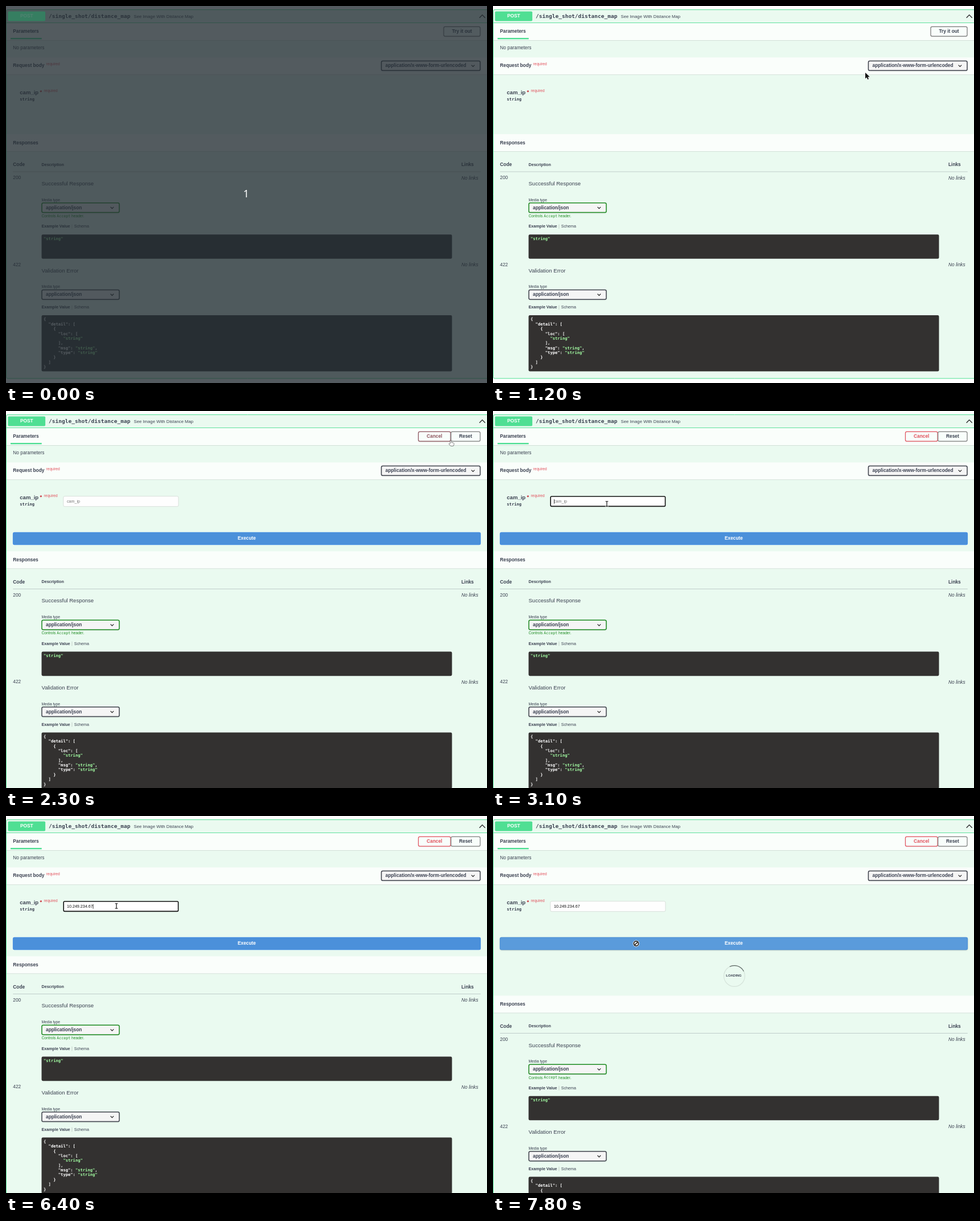
Write an HTML page with a canvas that moves like this. It is 845x662 px and loops after 8 s.

```html
<!DOCTYPE html>
<html lang="en">
<head>
<meta charset="utf-8">
<title>API form</title>
<style>
html, body { margin: 0; width: 100%; height: 100%; overflow: hidden; background: #fff }
canvas { display: block }
</style>
</head>
<body>
<canvas id="stage" width="845" height="662"></canvas>
<script>
const ctx = document.getElementById('stage').getContext('2d');
const LOOP = 8000, INK = '#3b4151', GREEN = '#4fdf93', RED = '#e2505c', LIME = '#a2fca2';
const SANS = '"Liberation Sans", Arial, sans-serif', MONO = '"DejaVu Sans Mono", monospace';
const BODY = 8.34, SMALL = 7.15, TINY = 6.67, BIG = 9.54;

const IP = '10.249.234.67';
const KEY_TIMES = [4000, 4200, 4400, 4700, 4800, 5000, 5200, 5400, 5500, 5700, 5900, 6100, 6400];

// Pointer positions: start time, x, y, shape
const POINTER = [
  [0, 0, 0, ''],
  [1000, 284, 47, 'arrow'], [1100, 480, 84, 'arrow'], [1200, 654, 117, 'arrow'],
  [1400, 706, 116, 'hand'], [1500, 822, 100, 'hand'], [1600, 780, 78, 'arrow'], [1700, 736, 67, 'arrow'],
  [1900, 768, 58, 'arrow'], [2000, 781.5, 52, 'hand'],
  [2500, 600, 92, 'arrow'], [2600, 380, 136, 'arrow'], [2700, 242, 159, 'beam'],
  [2900, 214, 170, 'arrow'], [3000, 204, 165, 'beam'], [3100, 200, 163, 'beam'], [3500, 194, 158, 'beam'],
  [7300, 206, 178, 'arrow'], [7400, 232, 204, 'arrow'], [7500, 250, 219, 'hand'],
  [7800, 251.5, 224, 'blocked']
];

const ERROR_JSON = ['{', '  "detail": [', '    {', '      "loc": [', '        |"string"', '      ],',
  '      "msg": |"string"|,', '      "type": |"string"', '    }', '  ]', '}'];

function text(str, x, y, { size = BODY, style = '', color = INK, font = SANS, align = 'left' } = {}) {
  ctx.font = `${style} ${size}px ${font}`;
  ctx.fillStyle = color;
  ctx.textAlign = align;
  ctx.textBaseline = 'middle';
  ctx.fillText(str, x, y);
  return x + ctx.measureText(str).width;
}
const bold = (str, x, y, opts) => text(str, x, y, { style: 'bold', ...opts });

function rect(x, y, w, h, color) {
  ctx.fillStyle = color;
  ctx.fillRect(x, y, w, h);
}

function box(x, y, w, h, { fill, stroke, line = 1.2, radius = 2.4, shadow = 0 }) {
  ctx.save();
  ctx.beginPath();
  ctx.roundRect(x, y, w, h, radius);
  if (shadow) {
    ctx.shadowColor = `rgba(0,0,0,${shadow})`;
    ctx.shadowBlur = 2.4;
    ctx.shadowOffsetY = .6;
  }
  if (fill) { ctx.fillStyle = fill; ctx.fill(); }
  ctx.shadowColor = 'transparent';
  if (stroke) { ctx.strokeStyle = stroke; ctx.lineWidth = line; ctx.stroke(); }
  ctx.restore();
}

function chevron(x, y, w, h, color, line) {
  ctx.beginPath();
  ctx.moveTo(x - w, y - h);
  ctx.lineTo(x, y + h);
  ctx.lineTo(x + w, y - h);
  ctx.strokeStyle = color;
  ctx.lineWidth = line;
  ctx.stroke();
}

function section(y) {
  rect(1, y, 844, 30, 'rgba(255,255,255,.75)');
  rect(1, y + 30, 844, .8, 'rgba(0,0,0,.13)');
}

function button(label, x, w, border, color, shadow = .12) {
  box(x, 36.3, w, 16.8, { fill: '#f8fefb', stroke: border, shadow });
  bold(label, x + w / 2, 44.7, { color, align: 'center' });
}

function select(label, x, y, w, border = '#41444e') {
  box(x, y, w, 16.8, { fill: '#f5f5f5', stroke: border, line: 1.5, shadow: .25 });
  bold(label, x + 7, y + 8.5);
  chevron(x + w - 12.6, y + 8.5, 2.8, 1.4, '#222', 1.2);
}

function code(lines, y, height) {
  box(62.5, y, 721, height, { fill: '#333130' });
  lines.forEach((line, row) => {
    let x = 66;
    line.split('|').forEach((part, i) => {
      x = bold(part, x, y + 7.6 + row * 8.37, { size: SMALL, font: MONO, color: i % 2 ? LIME : '#fff' });
    });
  });
}

function response(status, title, y, border) {
  text(status, 12.3, y);
  text('No links', 800, y, { style: 'italic' });
  text(title, 62.5, y + 10.2, { size: BIG });
  text('Media type', 62.5, y + 38.5, { size: TINY });
  select('application/json', 63, y + 43.6, 136, border);
}

function exampleTabs(y) {
  bold('Example Value', 62.5, y, { size: SMALL });
  rect(115.6, y - 4, .7, 8, '#b5bfba');
  text('Schema', 119.7, y, { size: SMALL });
}

function responses() {
  section(225);
  bold('Responses', 12.3, 240.3);
  bold('Code', 12.3, 279);
  bold('Description', 62.5, 279, { size: SMALL });
  bold('Links', 800, 279);
  rect(12.3, 290.6, 821.5, .8, 'rgba(59,65,81,.3)');

  response('200', 'Successful Response', 302.2, '#1f8c22');
  const green = { size: TINY, color: '#1f8c22' };
  let x = text('Controls ', 62.5, 369.2, green);
  x = text('Accept', x, 369.2, { ...green, font: MONO });
  text(' header.', x, 369.2, green);
  exampleTabs(387.2);
  code(['|"string"'], 401.2, 42.6);

  response('422', 'Validation Error', 454.8);
  exampleTabs(529.2);
  code(ERROR_JSON, 543, 98.6);
}

function header() {
  box(.5, 6.5, 860, 647.5, { fill: '#eafaf0', stroke: GREEN, line: 1 });
  rect(1, 29, 844, .9, GREEN);
  box(3.5, 9.5, 65.6, 17, { fill: GREEN, radius: 1.8 });
  bold('POST', 36.3, 18.2, { color: '#fff', align: 'center' });
  bold('/single_shot/distance_map', 75, 18.4, { size: BIG, font: MONO });
  text('See Image With Distance Map', 224.5, 18.4, { size: 7.75 });
  chevron(836.7, 18.2, 5, -2.6, '#222', 1.3);

  section(30);
  bold('Parameters', 12.3, 44.7);
  rect(8, 56, 54.7, 2.4, GREEN);
  text('No parameters', 12.3, 73.3);

  section(90.3);
  bold('Request body', 12.3, 105);
  text('required', 70.6, 102, { size: 6.55, color: RED });
  select('application/x-www-form-urlencoded', 659.5, 96.5, 173.5);

  bold('cam_ip', 24.3, 152, { size: BIG });
  bold('*', 59.6, 151, { size: BIG, color: '#c8202c' });
  text('required', 66.6, 149.2, { size: 6.55, color: RED });
  bold('string', 24.3, 164.3, { size: SMALL, font: MONO });
}

function caretVisible(t) {
  if (t < 4000) return t >= 3100 && t < 3800;
  if (t < 6400) return true;
  return t < 6900 || t >= 7400;
}

function editForm(t) {
  const cancel = t < 2500 ? '#8f545e' : RED;
  button('Cancel', 724.5, 56.5, cancel, cancel, t < 2500 ? .3 : .12);
  button('Reset', 781.8, 51.2, '#808080', INK);

  const focused = t >= 3100 && t < 7700;
  if (focused) box(101.2, 150, 201.4, 17.4, { fill: '#fff', stroke: '#111', line: 1.6, radius: 1.8 });
  else box(100.8, 149.7, 202.2, 18, { fill: '#fefefe', stroke: '#d2d8d4', line: .8 });
  const typed = IP.slice(0, KEY_TIMES.filter(k => t >= k).length);
  const end = text(typed, 107, 158.7, { size: SMALL, color: '#111' });
  if (!typed) text('cam_ip', 107, 158.7, { size: SMALL, color: '#777' });
  if (focused && caretVisible(t)) rect(end, 154.8, .8, 8, '#111');

  const hover = t >= 7500;
  box(12.5, 213.3, 821, 21.4, {
    fill: hover ? '#5a9bdb' : '#4b90da', stroke: hover ? '#4f93d8' : '#4990e2', shadow: hover ? .4 : 0
  });
  bold('Execute', 423, 224.2, { color: '#fff', align: 'center' });
}

function spinner(t) {
  const turn = (t - 7750) / 1000 * Math.PI * 2;
  const ring = (from, to, color) => {
    ctx.beginPath();
    ctx.arc(424, 281, 18.4, from, to);
    ctx.strokeStyle = color;
    ctx.lineWidth = 1.2;
    ctx.stroke();
  };
  ring(0, Math.PI * 2, 'rgba(85,85,85,.14)');
  ring(turn - Math.PI * .75, turn - Math.PI / 4, 'rgba(60,70,68,.8)');
  bold('LOADING', 423, 280.5, { size: 5.96, align: 'center' });
}

const SHAPES = {
  arrow: ['M0 0V10.6L2.5 8.3L4.2 12L6 11.2L4.4 7.6H7.8Z', '#111', '#fff'],
  hand: ['M-1 .6Q0 -.7 1 .6V3.6L4.6 4.4Q5.6 4.8 5.4 6L4.6 9H-.6L-3.2 5.6Q-3 4.2 -1 5.6Z', '#fff', '#111'],
  beam: ['M-2.4 -4.8H2.4V-3.8H.6V3.8H2.4V4.8H-2.4V3.8H-.6V-3.8H-2.4Z', '#111', '#fff']
};

function pointer(t) {
  const [, x, y, shape] = POINTER.findLast(p => t >= p[0]);
  if (!shape) return;
  ctx.save();
  ctx.translate(x, y);
  if (shape === 'blocked') {
    const disc = (r, color) => {
      ctx.beginPath();
      ctx.arc(0, 0, r, 0, Math.PI * 2);
      ctx.fillStyle = color;
      ctx.fill();
    };
    disc(5.8, '#fff');
    disc(5, '#222');
    disc(3.2, '#fff');
    ctx.beginPath();
    ctx.moveTo(-2.6, 2.6);
    ctx.lineTo(2.6, -2.6);
    ctx.strokeStyle = '#222';
    ctx.lineWidth = 1.6;
    ctx.stroke();
  } else {
    const [d, fill, stroke] = SHAPES[shape], path = new Path2D(d);
    ctx.strokeStyle = stroke;
    ctx.lineWidth = 1;
    ctx.lineJoin = 'round';
    ctx.stroke(path);
    ctx.fillStyle = fill;
    ctx.fill(path);
  }
  ctx.restore();
}

function countdown() {
  rect(0, 0, 845, 662, 'rgba(36,45,52,.78)');
  box(3.5, 9.5, 65.6, 17, { fill: 'rgba(73,204,144,.35)', radius: 1.8 });
  text('1', 422, 331, { size: 18, color: '#fff', font: '"Noto Sans", sans-serif', align: 'center' });
}

function draw(t) {
  const editing = t >= 2300, loading = t >= 7800;
  rect(0, 0, 845, 662, '#fff');
  header();
  if (editing) {
    rect(0, 640, 845, 22, '#eafaf0');
    rect(0, 640, 1, 22, GREEN);
    editForm(t);
  } else {
    const hover = t >= 2000;
    button('Try it out', 769, 64, hover ? '#666' : '#777', INK, hover ? .35 : .12);
  }
  ctx.save();
  ctx.translate(0, loading ? 90.5 : editing ? 21.4 : 0);
  responses();
  ctx.restore();
  if (loading) spinner(t);
  pointer(t);
  if (t < 100) countdown();
}

function tick() {
  draw(performance.now() % LOOP);
  requestAnimationFrame(tick);
}
tick();
</script>
</body>
</html>
```
